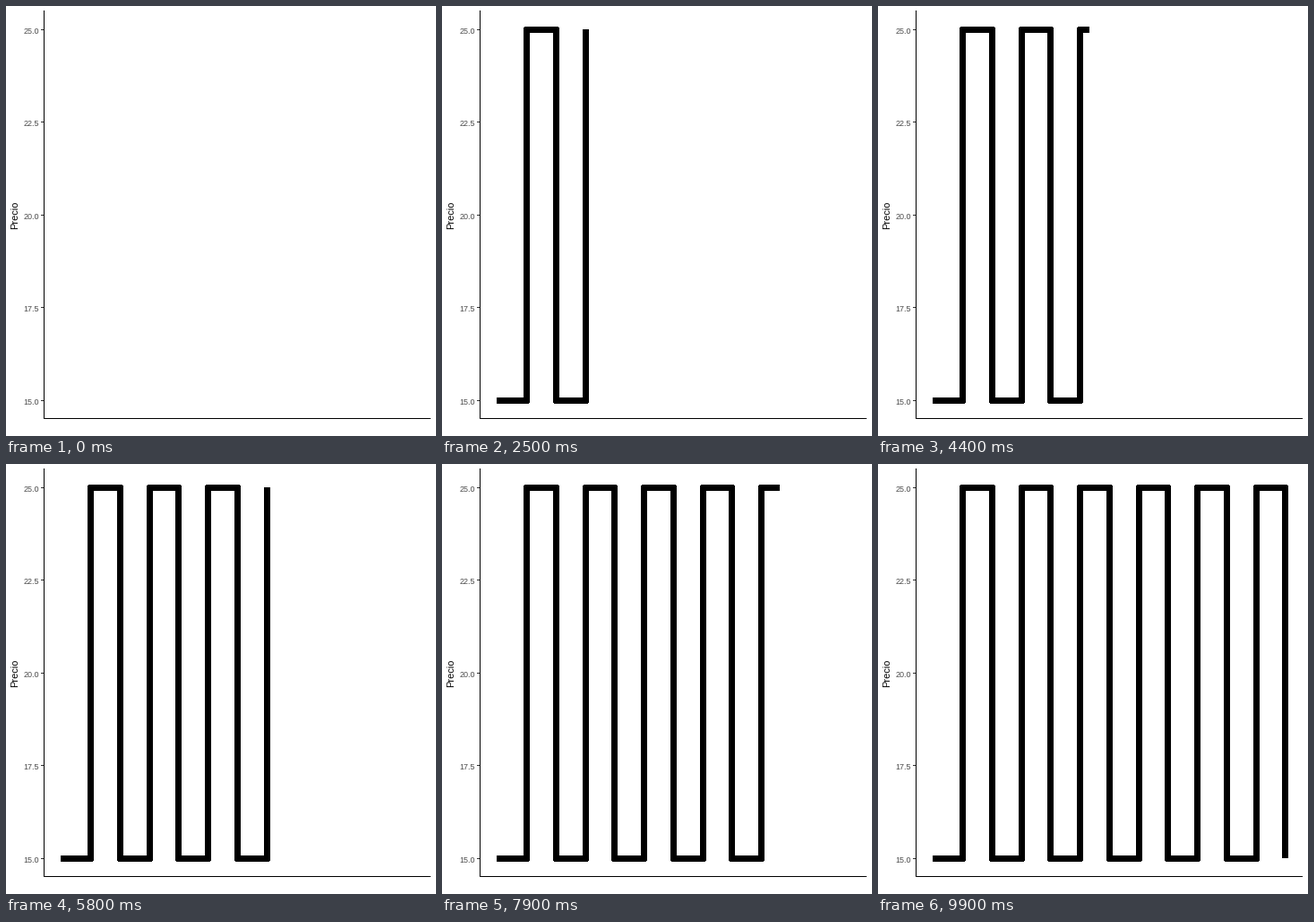
A matplotlib script that plays this animation: 480x480 px, repeating every 10 s.

```python
import numpy as np
import matplotlib.pyplot as plt
from matplotlib.animation import FuncAnimation

SIZE, DPI = 480, 72          # at 72 dpi one point is one pixel
FRAMES, STEPS = 100, 12
LOW, HIGH = 440, 26          # pixel rows of the prices 15 and 25
X0, DX = 61.9, 32.74         # first data point and spacing

plt.rcParams["font.family"] = "Liberation Sans"
fig = plt.figure(figsize=(SIZE / DPI, SIZE / DPI), dpi=DPI, facecolor="white")
ax = fig.add_axes([0, 0, 1, 1])
ax.set(xlim=(0, SIZE), ylim=(SIZE, 0))
ax.axis("off")


def stroke(xs, ys, color="black", width=1):
    line, = ax.plot(xs, ys, color=color, lw=width, antialiased=False,
                    snap=False, solid_capstyle="butt", solid_joinstyle="round")
    return line


def col(pos):
    return np.floor(X0 + DX * pos)


# Axes
stroke([42.5, 42.5], [5, 461])
stroke([42, 474], [460.5, 460.5])
for price in np.arange(15, 25.1, 2.5):
    y = np.floor(LOW + 0.4 - (price - 15) * (LOW - HIGH) / 10)
    stroke([39, 42], [y + 0.5, y + 0.5], "#333333")
    ax.text(37.3, y + 5, f"{price:.1f}", size=9, color="#4d4d4d",
            ha="right", va="baseline")
ax.text(15, 233.5, "Precio", size=11, rotation=90, ha="right", va="center")

# Each data point lands on a whole frame; the tip moves linearly in between
keys = np.round(np.arange(STEPS + 1) * (FRAMES - 1) / STEPS).astype(int)
wave = stroke([], [], width=7)


def level(i):
    return HIGH if i % 2 else LOW


def update(frame):
    if frame == 0:
        wave.set_data([], [])
        return wave,
    pos = np.interp(frame, keys, np.arange(STEPS + 1))
    last = int(pos)
    xs, ys = [col(0)], [LOW + 0.5]
    for i in range(1, last + 1):
        xs += [col(i) + 0.5] * 2
        ys += [level(i - 1) + 0.5, level(i) + 0.5]
    if pos > last:
        xs.append(col(pos))
        ys.append(level(last) + 0.5)
    else:
        ys[-1] = level(last)
    wave.set_data(xs, ys)
    return wave,


anim = FuncAnimation(fig, update, frames=FRAMES, interval=100,
                     repeat=True, repeat_delay=0)
plt.show()
```
